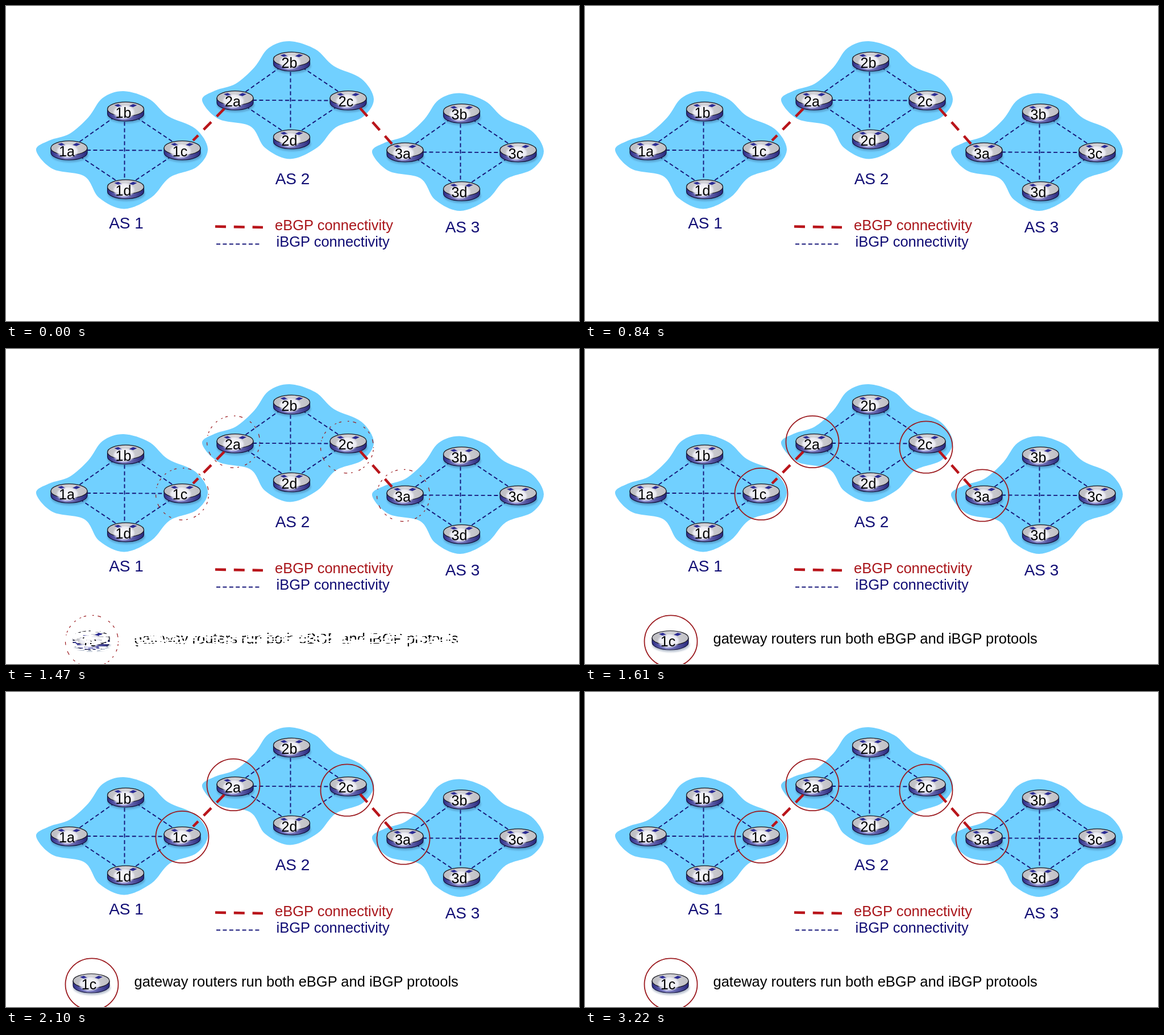
Animation, 1008 px wide and 555 px high, one loop 3.29 s. Source, as an HTML page:

```html
<!DOCTYPE html>
<html lang="en">
<head>
<meta charset="utf-8">
<title>Routing sessions</title>
<style>
  html, body { margin: 0; width: 100%; height: 100%; overflow: hidden; background: #fff; }
  svg { display: block; width: 100vw; height: 100vh; }
  text { font-family: "Liberation Sans", Arial, sans-serif; font-size: 25.5px; }
  .navy { fill: #100c74; }
  .red { fill: #a9161b; }
  .as { font-size: 28px; text-anchor: middle; }
  .tag { font-size: 25px; text-anchor: middle; }
  .inner { stroke: #16167a; stroke-width: 1.9; stroke-dasharray: 7 4.4; fill: none; }
  .outer { stroke: #b9151b; stroke-width: 4.6; stroke-dasharray: 19 13.8; fill: none; }
  .ring { stroke: #9b191e; fill: none; }
</style>
</head>
<body>
<svg id="stage" viewBox="0 0 1008 555" preserveAspectRatio="none"></svg>
<script>
const LOOP = 3290, TICK = 70;
const FADE_START = 1400, FADE_TIME = 175;

// key points of one cloud, clockwise from its left tip
const CLOUD = [
  [53, 254], [76, 237], [112, 225], [145, 196], [170, 162], [207, 150],
  [252, 164], [285, 194], [333, 216], [355, 252], [335, 284], [288, 302],
  [256, 337], [208, 357.5], [164, 338], [138, 300], [82, 287]
];

// the clouds share one shape and differ by a shift
const SHIFTS = [[0, 0], [292, -88], [591, 3.5]];
const RINGS = [[310, 255.5], [400, 163.5], [600, 173], [699, 258], [151, 515]];

// a, b, c, d sit left, top, right, bottom on an ellipse
const NODES = [...'abcd'].map((letter, i) => {
  const turn = Math.PI + i * Math.PI / 2;
  return { letter, x: 210.5 + 99.5 * Math.cos(turn), y: 250.2 + 68.5 * Math.sin(turn) };
});

function smooth(points) {
  const n = points.length, at = i => points[(i + n) % n];
  let d = `M${at(0)}`;
  for (let i = 0; i < n; i++) {
    const [p, a, b, q] = [at(i - 1), at(i), at(i + 1), at(i + 2)];
    const c1 = a.map((v, k) => v + (b[k] - p[k]) / 6);
    const c2 = b.map((v, k) => v - (q[k] - a[k]) / 6);
    d += `C${c1} ${c2} ${b}`;
  }
  return d + 'Z';
}

const line = (x1, y1, x2, y2, cls) => `<path class="${cls}" d="M${x1} ${y1}L${x2} ${y2}"/>`;
const text = (x, y, cls, str) => `<text x="${x}" y="${y}" class="${cls}">${str}</text>`;

const router = (x, y, name) => `
  <g transform="translate(${x} ${y})">
    <ellipse cx="1" cy="12" rx="33" ry="13" fill="#23406c" opacity=".3" filter="url(#soft)"/>
    <path d="M-32 0V8A32 13 0 0 0 32 8V0Z" fill="url(#side)" stroke="#15153c" stroke-width="1.2"/>
    <ellipse rx="32" ry="12.5" fill="url(#top)" stroke="#17171f" stroke-width="1.2"/>
    <path d="M-20 -7l7 -2 7 4 -6 2zM6 -5.5l7 -3.5 7 2 -7 3.5z" fill="#2a2a94"/>
    <ellipse cx="-3" cy="5.5" rx="20" ry="13" fill="url(#glow)"/>
    ${text(-4, 14.8, 'tag', name)}
  </g>`;

function area([dx, dy], index) {
  const [a, b, c, d] = NODES;
  const link = (p, q) => line(p.x, p.y + 2, q.x, q.y, 'inner');
  return `<g transform="translate(${dx} ${dy})">
    <path d="${smooth(CLOUD)}" fill="#71d0ff"/>
    ${link(a, b)}${link(b, c)}${link(a, d)}${link(c, d)}
    ${line(142, 254, 278, 254.5, 'inner')}${line(208.5, 204, 208.5, 307, 'inner')}
    ${NODES.map(n => router(n.x, n.y, index + 1 + n.letter)).join('')}
  </g>`;
}

const stage = document.getElementById('stage');
stage.innerHTML = `
  <defs>
    <linearGradient id="side">
      <stop offset="0" stop-color="#2b2b86"/><stop offset=".4" stop-color="#8b8bcc"/>
      <stop offset="1" stop-color="#27277c"/>
    </linearGradient>
    <linearGradient id="top">
      <stop offset="0" stop-color="#bcbcc1"/><stop offset=".5" stop-color="#d2d2d7"/>
      <stop offset="1" stop-color="#bfbfc4"/>
    </linearGradient>
    <radialGradient id="glow">
      <stop offset="0" stop-color="#fff" stop-opacity=".88"/>
      <stop offset=".8" stop-color="#f4f4fc" stop-opacity=".8"/>
      <stop offset="1" stop-color="#f0f0fa" stop-opacity="0"/>
    </radialGradient>
    <filter id="soft" x="-20%" y="-40%" width="140%" height="180%">
      <feGaussianBlur stdDeviation="1.6"/>
    </filter>
    <mask id="grain" maskUnits="userSpaceOnUse" x="100" y="490" width="710" height="65">
      <path id="streaks" stroke="#fff" stroke-width="2.2" fill="none"/>
    </mask>
  </defs>
  <rect width="1008" height="555" fill="#fff"/>
  ${SHIFTS.map(area).join('')}
  ${line(384, 181, 329, 237, 'outer')}
  ${line(623, 180, 679, 243, 'outer')}
  ${text(211.5, 392, 'navy as', 'AS 1')}
  ${text(504, 314, 'navy as', 'AS 2')}
  ${text(803, 399, 'navy as', 'AS 3')}
  ${line(368, 388.5, 452, 390, 'outer')}
  ${line(370, 419.5, 446, 419.5, 'inner')}
  ${text(473, 395, 'red', 'eBGP connectivity')}
  ${text(475.5, 424, 'navy', 'iBGP connectivity')}
  <g id="gateway">
    <g id="rings">${RINGS.map(([x, y]) =>
      `<ellipse class="ring" cx="${x}" cy="${y}" rx="46.5" ry="45.7"/>`).join('')}</g>
    <g id="note">
      ${router(150, 509, '1c')}
      ${text(225.5, 519, '', 'gateway routers run both eBGP and iBGP protools')}
    </g>
  </g>`;

function makeRandom(seed) {
  return () => (seed = (seed * 16807) % 2147483647) / 2147483647;
}

// short horizontal runs; a larger share keeps all earlier runs
function streaks(share) {
  const rnd = makeRandom(417);
  let d = '';
  for (let y = 493; y < 535; y += 2) {
    for (let x = 104; x < 806;) {
      const len = 3 + rnd() * 8;
      if (rnd() < share) d += `M${x.toFixed(1)} ${y}h${len.toFixed(1)}`;
      x += len;
    }
  }
  return d;
}

function arcs(share) {
  const rnd = makeRandom(93);
  return Array.from({ length: 12 }, () => {
    const span = 5 + rnd() * 16, on = span * share * (0.6 + rnd() * 0.4);
    return `${on.toFixed(1)} ${(span - on).toFixed(1)}`;
  }).join(' ');
}

const [gateway, rings, note, grain] =
  ['gateway', 'rings', 'note', 'streaks'].map(id => document.getElementById(id));
let shown = -1;

function show(share) {
  if (share === shown) return;
  shown = share;
  const whole = share === 1;
  gateway.style.display = share ? '' : 'none';
  rings.style.strokeWidth = 0.8 + share;
  rings.style.strokeDasharray = whole ? 'none' : arcs(share);
  grain.setAttribute('d', streaks(share));
  if (whole) note.removeAttribute('mask');
  else note.setAttribute('mask', 'url(#grain)');
}

function frame() {
  const t = Math.floor((performance.now() % LOOP) / TICK) * TICK;
  show(Math.min(1, Math.max(0, (t - FADE_START) / FADE_TIME)));
  requestAnimationFrame(frame);
}
frame();
</script>
</body>
</html>
```
